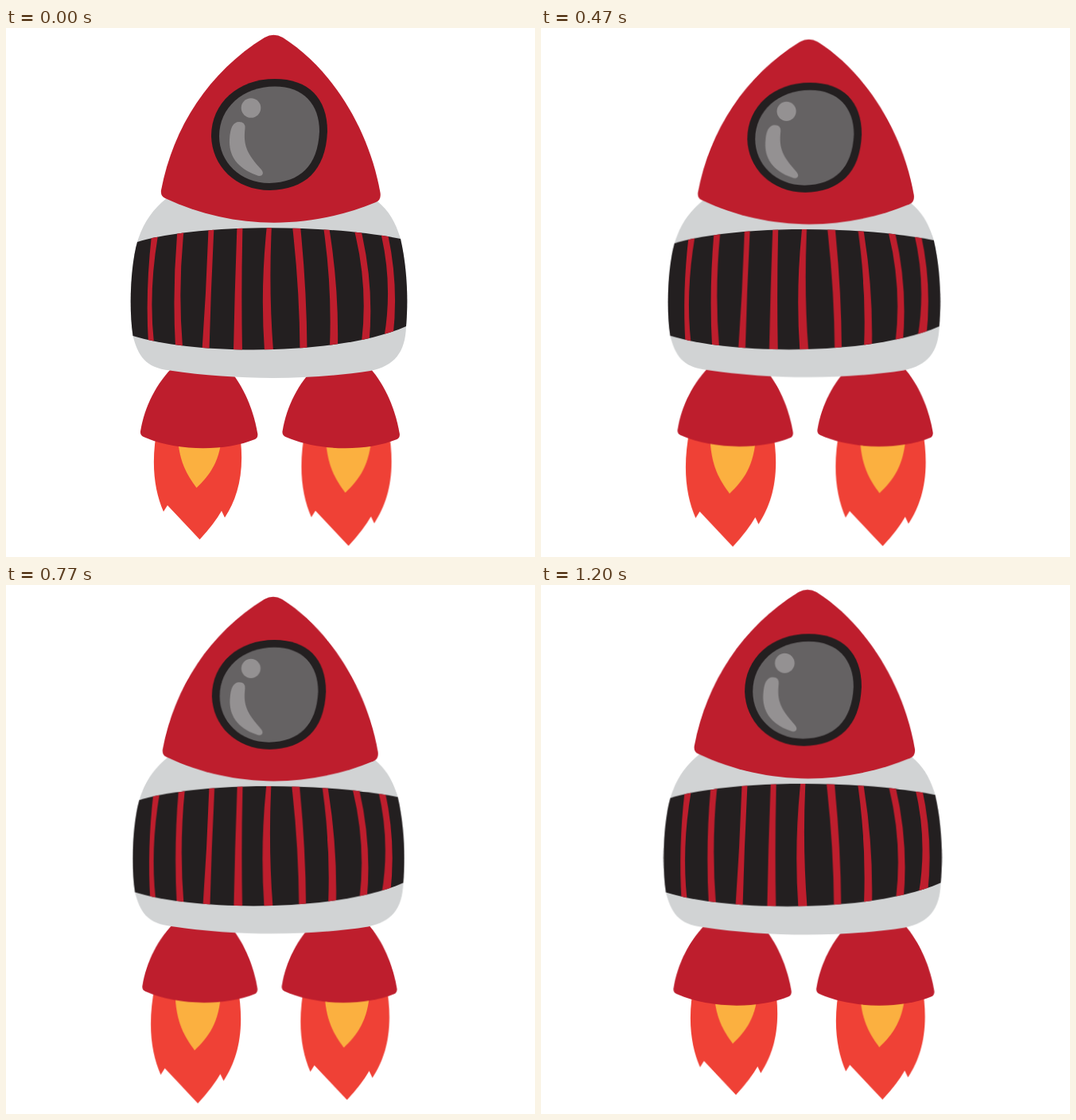
Animation, 665 px wide and 665 px high, one loop 1.23 s. Source, as an HTML page:

```html
<!DOCTYPE html>
<html lang="en">
<head>
<meta charset="utf-8">
<title>Rocket</title>
<style>
html, body { margin: 0; width: 100%; height: 100%; overflow: hidden; background: #fff; }
svg { display: block; width: 100vw; height: 100vh; }
.red { fill: #be1e2d; }
.dark { fill: #231f20; }
.hull { fill: #d1d3d4; }
.glass { fill: #656263; }
.shine { fill: #949192; }
.fire { fill: #ef4136; }
.core { fill: #fbb040; }

/* 37 drawings per loop; steps() holds each one */
.rocket, .left, .right {
  animation: shake 1230ms -4ms infinite;
  transform-origin: 330px 380px;
}
.left, .right { transform-origin: 332.5px 332.5px; }
.left { animation-name: burn-left; }
.right { animation-name: burn-right; }

@keyframes shake {
  0%, 100% { transform: translate(0, 0) scale(1); animation-timing-function: steps(5); }
  13.514% { transform: translate(-.5px, -.4px) scale(.981); animation-timing-function: steps(3); }
  21.622% { transform: translate(0, 1px) scale(1.02); animation-timing-function: steps(1); }
  24.324% { transform: translate(0, .5px) scale(1.005); animation-timing-function: steps(5); }
  37.838% { transform: translate(.25px, 0) scale(.985); animation-timing-function: steps(3); }
  45.946% { transform: translate(0, 0) scale(1.018); animation-timing-function: steps(1); }
  48.649% { transform: translate(-.5px, -.6px) scale(1.005); animation-timing-function: steps(2); }
  54.054% { transform: translate(-1px, -1.3px) scale(.993); animation-timing-function: steps(3); }
  62.162% { transform: translate(-.5px, -.6px) scale(.982); animation-timing-function: steps(3); }
  70.27% { transform: translate(0, -.3px) scale(1.02); animation-timing-function: steps(1); }
  72.973% { transform: translate(0, 0) scale(1.005); animation-timing-function: steps(4); }
  83.784% { transform: translate(-.5px, .4px) scale(.986); animation-timing-function: steps(3); }
  91.892% { transform: translate(0, 1px) scale(1.018); animation-timing-function: steps(2); }
  97.297% { transform: translate(-1.5px, -.6px) scale(1.006); animation-timing-function: steps(1); }
}
@keyframes burn-left {
  0%, 100% { transform: translate(0, 0) scale(1); animation-timing-function: steps(5); }
  13.514% { transform: translate(-.5px, -.6px) scale(1.022); animation-timing-function: steps(5); }
  27.027% { transform: translate(0, 0) scale(.994); animation-timing-function: steps(4); }
  37.838% { transform: translate(0, .6px) scale(1.027); animation-timing-function: steps(6); }
  54.054% { transform: translate(1.2px, 1.5px) scale(.994); animation-timing-function: steps(3); }
  62.162% { transform: translate(0, .5px) scale(1.026); animation-timing-function: steps(3); }
  70.27% { transform: translate(-1px, .1px) scale(1.006); animation-timing-function: steps(2); }
  75.676% { transform: translate(0, .3px) scale(.994); animation-timing-function: steps(3); }
  83.784% { transform: translate(.7px, .5px) scale(1.024); animation-timing-function: steps(5); }
  97.297% { transform: translate(.7px, .7px) scale(.991); animation-timing-function: steps(1); }
}
@keyframes burn-right {
  0%, 100% { transform: translate(0, 0) scale(1); animation-timing-function: steps(5); }
  13.514% { transform: translate(.2px, .3px) scale(.966); animation-timing-function: steps(5); }
  27.027% { transform: translate(-.5px, .4px) scale(1.003); animation-timing-function: steps(4); }
  37.838% { transform: translate(-1px, .5px) scale(1); animation-timing-function: steps(2); }
  43.243% { transform: translate(-1px, .5px) scale(.97); animation-timing-function: steps(4); }
  54.054% { transform: translate(-1.5px, 1px) scale(1); animation-timing-function: steps(6); }
  70.27% { transform: translate(.4px, .8px) scale(.972); animation-timing-function: steps(5); }
  83.784% { transform: translate(.5px, -1px) scale(1); animation-timing-function: steps(5); }
  97.297% { transform: translate(-.1px, -.2px) scale(.988); animation-timing-function: steps(1); }
}
</style>
</head>
<body>
<svg viewBox="0 0 665 665">
  <defs>
    <g id="flame">
      <path class="fire" d="M191 498C181.500 545 186 580 198 608L203 600L243.500 643Q262 623 271 607L275 615.500C293 588 302 552 292 498Z"/>
      <path class="core" d="M215.500 505C216 545 228 562 239.500 578C256 562 270 545 272 505Z"/>
    </g>
    <path id="nozzle" class="red" d="M212 424C189 446 174 476 169 507Q168.500 512 173 514C215 532.500 275 532.500 313 517Q317 515 316.300 510C310 473 294 443 276 424Z"/>
    <path id="band" d="M165 269C240 246 400 246 496 265C504 300 506 340 503 375C420 412 240 412 159.500 387C154 350 157 297 165 269Z"/>
    <clipPath id="clip"><use href="#band"/></clipPath>
  </defs>

  <g class="left"><use href="#flame"/></g>
  <g class="right"><use href="#flame" transform="matrix(1.027 0 0 1.027 180.500 -9.400)"/></g>

  <g class="rocket">
    <use href="#nozzle"/>
    <use href="#nozzle" x="178.500"/>
    <path class="hull" d="M202 214C184 228 172 246 165 269C157 297 154 350 159.500 387C166 412 175 427 206 430.500C290 443 380 443 458 431C488 425 502 408 503 375C506 340 504 300 496 265C490 245 482 230 466 217Z"/>
    <use href="#band" class="dark"/>
    <g class="red" clip-path="url(#clip)">
      <path d="M183 261Q175 332 179 396H186Q179 332 191 261Z"/>
      <path d="M215.500 255Q209 328 213 401H222Q216 328 223.500 255Z"/>
      <path d="M254.500 251Q252 328 246.500 405H255.500Q257.500 328 261.500 251Z"/>
      <path d="M290.500 249Q287.500 328 286 406H297Q295.500 328 297.500 249Z"/>
      <path d="M328 248Q319.500 328 325 406H336Q330 328 334 248Z"/>
      <path d="M360 249Q369 328 369.500 405H378.500Q378 328 370 249Z"/>
      <path d="M399 250Q410 326 407 401H417Q418.500 326 406 250Z"/>
      <path d="M437.500 253Q455.500 324 447 395H456.500Q463 324 446 253Z"/>
      <path d="M471 257Q486.500 322 475.500 388H486.500Q494 322 479.500 257Z"/>
    </g>
    <path class="red" d="M325 12Q336.500 5.500 348 12C408 50 456 125 470.500 207Q472 216 465 219C380 254 285 254 200 214Q194 211 195 204C210 125 255 55 325 12Z"/>
    <path class="dark" d="M338 64C380 64 404 88 404 130C402 180 375 203 332 204C288 204 259 173 258 136C258 94 292 64 338 64Z"/>
    <path class="glass" d="M338 73.500C374 73.500 394 96 394 130C392 173 370 194 331 195C294 195 268 168 268 136C268 100 298 73.500 338 73.500Z"/>
    <circle class="shine" cx="308" cy="100.500" r="12.300"/>
    <path class="shine" d="M293 118Q301 118 300.500 126C298 148 303 158 321 178C326 184 320 188 315 185C290 176 280 160 281 140Q282 118 293 118Z"/>
  </g>
</svg>
</body>
</html>
```
